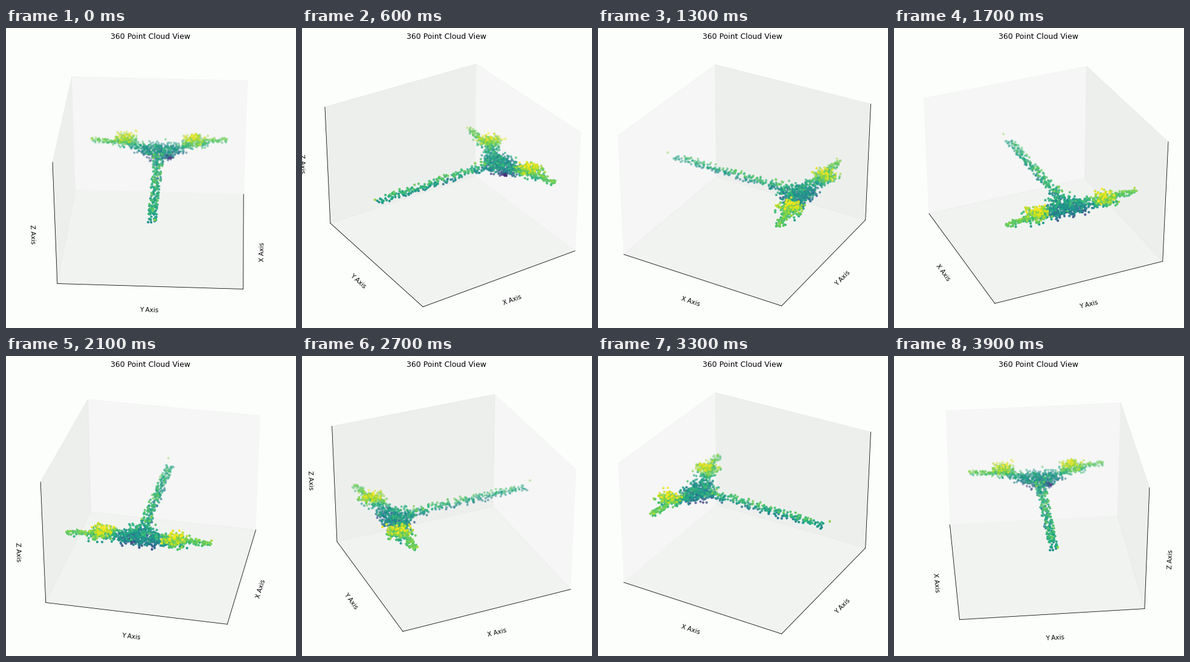
Recreate the animation shown at these times as a matplotlib script. Size 480 by 497 pixels, loop 4000 ms.

```python
import numpy as np
import matplotlib.pyplot as plt
from matplotlib.animation import FuncAnimation

W, H, DPI = 480, 497, 72
SIDE = 465            # square plot area in pixels
HALF, HALF_Z = 0.595, 0.446
FRAMES = 40
BG = "#fcfefc"

rng = np.random.default_rng(11)


def blob(n, center, spread):
    """Gaussian cluster, cut at two deviations."""
    noise = np.clip(rng.normal(size=(n, 3)), -2, 2)
    return np.asarray(center) + noise * spread


def tail(n):
    x = rng.uniform(-0.32, 0.555, n)
    taper = 1 - 0.4 * x
    y = 0.011 + rng.uniform(-0.032, 0.032, n) * taper
    z = 0.022 + np.clip(rng.normal(0, 0.014, n), -0.026, 0.026) * taper
    return np.column_stack([x, y, z])


def strip(n, span, line_x, line_z, spread):
    """Points along y; x and z follow straight lines (offset, slope)."""
    y = rng.uniform(*span, n)
    x = line_x[0] + line_x[1] * y
    z = line_z[0] + line_z[1] * y
    return np.column_stack([x, y, z]) + blob(n, 0, spread)


def wing(side, sweep):
    parts = np.vstack([
        strip(110, (0.06, 0.22), (-0.39, -0.2), (-0.015, 0.2), (0.035, 0.01, 0.014)),
        blob(165, (-0.463, 0.245, 0.047), (0.042, 0.042, 0.016)),
        strip(55, (0.28, 0.465), (-0.405, -sweep), (0.013, 0.07), (0.014, 0.005, 0.008)),
    ])
    parts[:, 1] = side * parts[:, 1] + 0.008
    return parts


points = np.vstack([
    tail(240),
    blob(260, (-0.385, 0.008, 0.004), (0.052, 0.055, 0.017)),
    blob(24, (-0.375, 0.075, -0.036), (0.022, 0.018, 0.006)),
    wing(1, sweep=0.2),
    wing(-1, sweep=0.1),
    [(0.596, 0.031, 0.053)],
])
x, y, z = points.T
shade = np.clip((z + 0.055) / 0.13, 0, 1)

fig = plt.figure(figsize=(W / DPI, H / DPI), dpi=DPI, facecolor=BG)
ax = fig.add_axes([7.6 / W, 7.3 / H, SIDE / W, SIDE / H], projection="3d")
ax.set_facecolor(BG)
ax.scatter(x, y, z, c=shade, cmap="viridis", vmin=0, vmax=1, s=7, linewidths=1.55)

ax.set(xlim=(-HALF, HALF), ylim=(-HALF, HALF), zlim=(-HALF_Z, HALF_Z),
       xticks=[], yticks=[], zticks=[])
for axis, name, gray in zip((ax.xaxis, ax.yaxis, ax.zaxis), "XYZ", (0.95, 0.90, 0.925)):
    axis.set_pane_color((gray - 0.004, gray, gray - 0.004, 0.6))
    axis.set_label_text(f"{name} Axis", fontsize=10.4)
    axis.labelpad = 5
fig.text(0.499, 1 - 18.5 / H, "360 Point Cloud View", fontsize=12.5,
         ha="center", va="baseline")


def update(i):
    ax.view_init(elev=30, azim=3 + i * 360 / FRAMES)
    return []


anim = FuncAnimation(fig, update, frames=FRAMES, interval=100, repeat=True,
                     repeat_delay=0, blit=False)
plt.show()
```
